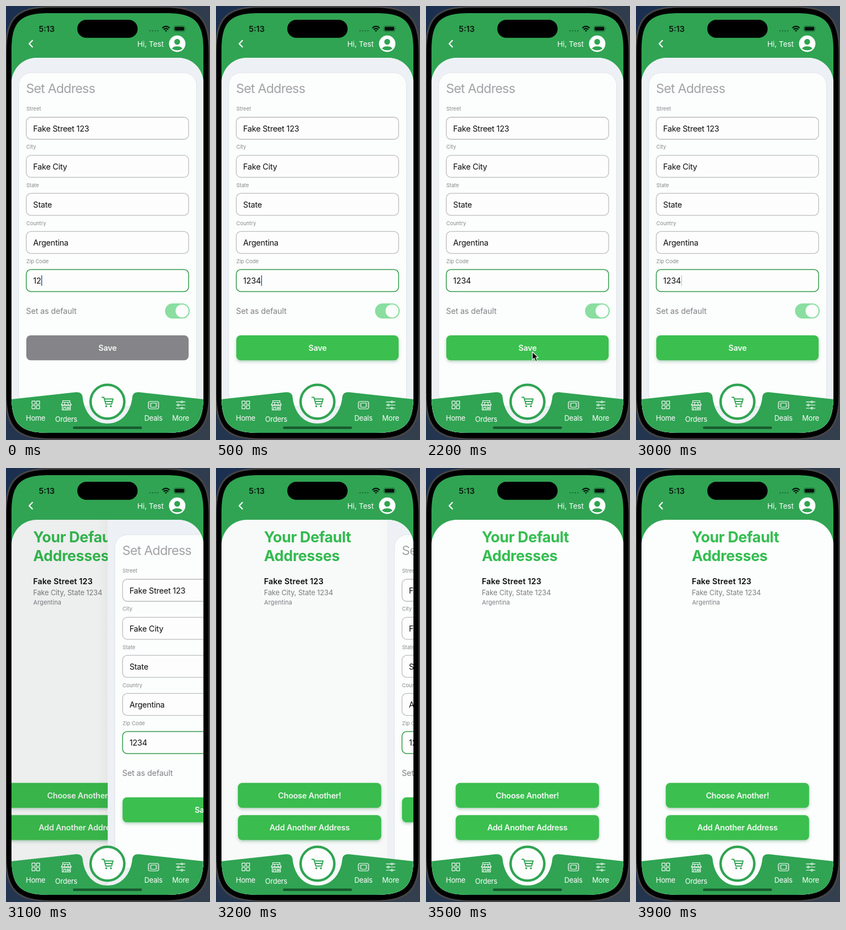
An HTML page that plays this animation: 372x788 px, repeating every 4000 ms.

```html
<!DOCTYPE html>
<html lang="en">
<head>
<meta charset="utf-8">
<title>Set address</title>
<style>
  html, body { margin: 0; width: 100%; height: 100%; overflow: hidden; background: #14202f; }
  svg { display: block; width: 372px; height: 788px; }
  text { font-family: Inter, "Open Sans", sans-serif; font-size: 14.5px; letter-spacing: -.01em; white-space: pre; }
  .title { font-size: 23.5px; letter-spacing: -.036em; fill: #a3a3a7; }
  .label { font-size: 9.5px; letter-spacing: 0; fill: #88888c; }
  .value { letter-spacing: -.015em; fill: #0c0c0c; }
  .button { font-weight: 600; letter-spacing: -.016em; fill: #f4fbf5; text-anchor: middle; }
  .big { font-size: 27px; font-weight: 700; letter-spacing: -.014em; fill: #34bd50; }
  .street { font-weight: 600; letter-spacing: .007em; fill: #0c0c0c; }
  .city { font-size: 13px; letter-spacing: -.011em; fill: #7d7d81; }
  .country { font-size: 11px; letter-spacing: .008em; fill: #7d7d81; }
  .tab { font-size: 13px; letter-spacing: -.02em; fill: #fff; text-anchor: middle; }
  .icon { fill: none; stroke: #fff; stroke-width: 1.15; stroke-linecap: round; stroke-linejoin: round; }
</style>
</head>
<body>
<svg viewBox="0 0 372 788" xmlns="http://www.w3.org/2000/svg">
  <defs>
    <linearGradient id="wall" x1="0" y1="0" x2="1" y2=".4">
      <stop offset="0" stop-color="#1a2f50"/>
      <stop offset="1" stop-color="#343f4e"/>
    </linearGradient>
    <linearGradient id="edge">
      <stop offset="0" stop-color="#000" stop-opacity="0"/>
      <stop offset="1" stop-color="#000" stop-opacity=".06"/>
    </linearGradient>
    <filter id="lift" x="-10%" y="-20%" width="120%" height="160%">
      <feDropShadow dx="0" dy="2.7" stdDeviation="2.5" flood-color="#2d7d45" flood-opacity=".33"/>
    </filter>
    <clipPath id="screen"><path id="glass"/></clipPath>
    <clipPath id="sheet"><path d="M10 775V140A46 46 0 0 1 56 94H314A46 46 0 0 1 360 140V775Z"/></clipPath>
  </defs>

  <rect width="372" height="788" fill="url(#wall)"/>
  <path id="body" fill="#000" stroke="#454548" stroke-width="3"/>

  <g clip-path="url(#screen)">
    <rect x="10" y="13" width="350" height="762" fill="#30a453"/>

    <g clip-path="url(#sheet)">
      <rect x="10" y="94" width="350" height="681" fill="#fcfdfd"/>
      <g id="list">
        <text class="big" x="101.8" y="135">Your Default</text>
        <text class="big" x="101.8" y="168.5">Addresses</text>
        <text class="street" x="101.8" y="211">Fake Street 123</text>
        <text class="city" x="101.8" y="231">Fake City, State 1234</text>
        <text class="country" x="102.2" y="248">Argentina</text>
        <g filter="url(#lift)" fill="#3abf4f">
          <rect x="54.3" y="571.7" width="261.4" height="45.3" rx="8"/>
          <rect x="54.3" y="630.2" width="261.4" height="45.3" rx="8"/>
        </g>
        <text class="button" x="185" y="599.5">Choose Another!</text>
        <text class="button" x="185" y="658">Add Another Address</text>
      </g>
      <rect id="dim" x="10" y="94" width="350" height="681"/>

      <g id="form">
        <rect id="shade" x="-10" y="94" width="20" height="681" fill="url(#edge)"/>
        <rect x="10" y="94" width="350" height="681" fill="#edf1f5"/>
        <rect x="23" y="121" width="324.5" height="606.5" rx="23" fill="#fcfdfd" stroke="#dfe3e8"/>
        <text class="title" x="36.5" y="158">Set Address</text>
        <g id="fields"></g>
        <rect id="caret" y="489" width="1.7" height="19" fill="#2b74cc"/>
        <text x="36.5" y="559" fill="#808084">Set as default</text>
        <rect x="290" y="540" width="45" height="27.5" rx="13.75" fill="#8adea0"/>
        <circle cx="321" cy="553.7" r="11.8" fill="#fcfdfd"/>
        <rect id="save" x="37" y="598" width="296" height="45.3" rx="8"/>
        <text class="button" x="185.2" y="626">Save</text>
      </g>
    </g>

    <!-- tab bar -->
    <path fill="#30a453" d="M10 714L127 701.3Q138 700 139.5 709C142.5 740 161 758 185 758C209 758 227.5 740 230.5 709Q232 700 243 701.3L360 714V775H10Z"/>
    <circle cx="185" cy="718.5" r="30.8" fill="#fdfefd" stroke="#30a453" stroke-width="4.5"/>
    <path d="M175 710.5H178.5L182 722.8H192.5L195.3 713.5H179.5M181 718H194" fill="none" stroke="#30a453" stroke-width="1.9" stroke-linecap="round" stroke-linejoin="round"/>
    <g fill="#30a453"><circle cx="182.8" cy="726.8" r="1.8"/><circle cx="191.3" cy="726.8" r="1.8"/></g>

    <g class="icon">
      <g id="squares"></g>
      <path d="M103.5 716.5H116.5V719.5H103.5ZM103.5 719.5L101 724H119L116.5 719.5M107.5 719.5L106.5 724M112.5 719.5L113.5 724"/>
      <path d="M101 724Q103.2 728 106 724.5Q108 728 110 724.5Q112 728 114 724.5Q116.8 728 119 724M102.5 727V733.5H117.5V727M105 733V728.8H109V733M111.5 728.8H115.5V731.3H111.5Z"/>
      <rect x="259.5" y="718" width="19" height="13.5" rx="3.5"/>
      <rect x="264" y="721" width="10" height="7.5" rx=".8"/>
      <path d="M261.8 721.5V728.5M276.2 721.5V728.5" stroke-dasharray="0 2.8"/>
      <path d="M310.5 718.8H326.5M310.5 724.5H326.5M310.5 730.2H326.5"/>
      <g fill="#30a453">
        <circle cx="320.8" cy="718.8" r="1.6"/><circle cx="314.2" cy="724.5" r="1.6"/><circle cx="320.8" cy="730.2" r="1.6"/>
      </g>
    </g>
    <text class="tab" x="54" y="753">Home</text>
    <text class="tab" x="109.8" y="754.5">Orders</text>
    <text class="tab" x="268.8" y="753">Deals</text>
    <text class="tab" x="318.5" y="752.5">More</text>
    <rect x="122" y="763.5" width="126" height="4.5" rx="2.25" fill="#185a2e"/>

    <!-- header -->
    <path d="M48 62.8L42.3 68.5L48 74.2" fill="none" stroke="#fff" stroke-width="2.3" stroke-linecap="round" stroke-linejoin="round"/>
    <text x="239.5" y="73.5" fill="#fff" style="font-size:13.5px;letter-spacing:0">Hi, Test</text>
    <circle cx="312.2" cy="68.5" r="15" fill="#fff"/>
    <circle cx="312.2" cy="65" r="5.3" fill="#30a453"/>
    <path d="M302.8 77.5C304.5 71.8 319.9 71.8 321.6 77.5Q317.5 80.6 312.2 80.6Q306.9 80.6 302.8 77.5Z" fill="#30a453"/>
    <text x="59.8" y="47" font-weight="600" fill="#08150c" style="letter-spacing:0">5:13</text>
    <rect x="130" y="25" width="110" height="32.7" rx="16.3"/>
    <path d="M262.7 45H278" stroke="#1d6a36" stroke-width="2.4" stroke-linecap="round" stroke-dasharray="0 4.7"/>
    <path d="M285 40Q291.7 33.8 298.4 40M287.5 42.9Q291.7 39 295.9 42.9" fill="none" stroke="#07130b" stroke-width="2.2"/>
    <path d="M289.5 44.5Q291.7 42.8 293.9 44.5L291.7 46.8Z" fill="#07130b"/>
    <rect x="306" y="36.3" width="20.5" height="10" rx="3" fill="none" stroke="#1d6a36"/>
    <rect x="307.5" y="37.8" width="17.5" height="7" rx="1.8" fill="#07130b"/>
    <path d="M328 39.8Q329.6 41.3 328 42.8Z" fill="#1d6a36"/>
  </g>

  <path id="pointer" d="M0 0V14.5L3.4 11.4L6 17.2L8.7 16L6.2 10.4H10.7Z" fill="#000" stroke="#fff" stroke-width="1.1" stroke-linejoin="round"/>
</svg>
<script>
const LOOP = 4000, STEP = 100, WIDTH = 350;
const PUSH_AT = 3007, STIFFNESS = 0.0181;
const el = id => document.getElementById(id);

// Rectangle with continuous corners: reach is the corner length, pull its handle
function smoothRect(x, y, w, h, reach, pull) {
  const r = x + w, b = y + h;
  return `M${x} ${y + reach}C${x} ${y + pull} ${x + pull} ${y} ${x + reach} ${y}
    H${r - reach}C${r - pull} ${y} ${r} ${y + pull} ${r} ${y + reach}
    V${b - reach}C${r} ${b - pull} ${r - pull} ${b} ${r - reach} ${b}
    H${x + reach}C${x + pull} ${b} ${x} ${b - pull} ${x} ${b - reach}Z`;
}
el('glass').setAttribute('d', smoothRect(10, 13, 350, 762, 68, 15.6));
el('body').setAttribute('d', smoothRect(-0.5, 1.5, 371.5, 785, 84, 19.7));

const rows = [['Street', 'Fake Street 123'], ['City', 'Fake City'], ['State', 'State'],
  ['Country', 'Argentina'], ['Zip Code', '']];
el('fields').innerHTML = rows.map(([label, value], i) => {
  const y = 202 + i * 69.1, last = i === rows.length - 1;
  return `<text class="label" x="37" y="${y - 11.7}">${label}</text>
    <rect x="37" y="${y}" width="296" height="40" rx="8.5" fill="#fdfdfd"
      stroke="${last ? '#309a49' : '#bcbcbe'}" stroke-width="${last ? 1.5 : 1.3}"/>
    <text class="value" x="49.6" y="${y + 25.5}" ${last ? 'id="zip"' : ''}>${value}</text>`;
}).join('');

el('squares').innerHTML = [0, 1, 2, 3].map(i =>
  `<rect x="${47.3 + i % 2 * 8.2}" y="${717.3 + (i >> 1) * 8.2}" width="5.9" height="5.9" rx=".8"/>`).join('');

const form = el('form'), list = el('list'), dim = el('dim'), shade = el('shade');
const zip = el('zip'), caret = el('caret'), save = el('save'), pointer = el('pointer');

// Solid while typing, then a one second blink with soft ends
function caretAlpha(t) {
  if (t < 900) return 1;
  const p = (t + 600) % 1000;
  if (p < 100) return 0.3;
  if (p < 600) return 1;
  return p < 700 ? 0.3 : 0;
}

// Share of the push still to go, critically damped
function remaining(t) {
  const x = Math.max(0, t - PUSH_AT) * STIFFNESS;
  return (1 + x) * Math.exp(-x);
}

function draw(t) {
  const digits = t < 200 ? 2 : t < 400 ? 3 : 4;
  zip.textContent = '1234'.slice(0, digits);
  caret.setAttribute('x', 50 + zip.getComputedTextLength());
  caret.setAttribute('opacity', caretAlpha(t));

  const ready = digits === 4;
  save.setAttribute('fill', ready ? '#3abf4f' : '#858488');
  save.setAttribute('filter', ready ? 'url(#lift)' : 'none');

  const glide = Math.pow(1 - Math.min(1, Math.max(0, (t - 1900) / 300)), 2);
  pointer.setAttribute('transform', `translate(${194 + 18 * glide} ${628 + 14 * glide})`);
  pointer.setAttribute('visibility', t >= 2000 && t < 3000 ? 'visible' : 'hidden');

  const left = remaining(t);
  form.setAttribute('transform', `translate(${WIDTH * (1 - left)} 0)`);
  list.setAttribute('transform', `translate(${-0.3 * WIDTH * left} 0)`);
  dim.setAttribute('opacity', 0.12 * left);
  shade.setAttribute('opacity', left);
}

const start = performance.now();
function tick() {
  const t = (performance.now() - start) % LOOP;
  draw(Math.floor((t + 4) / STEP) * STEP % LOOP);
  requestAnimationFrame(tick);
}
tick();
</script>
</body>
</html>
```
